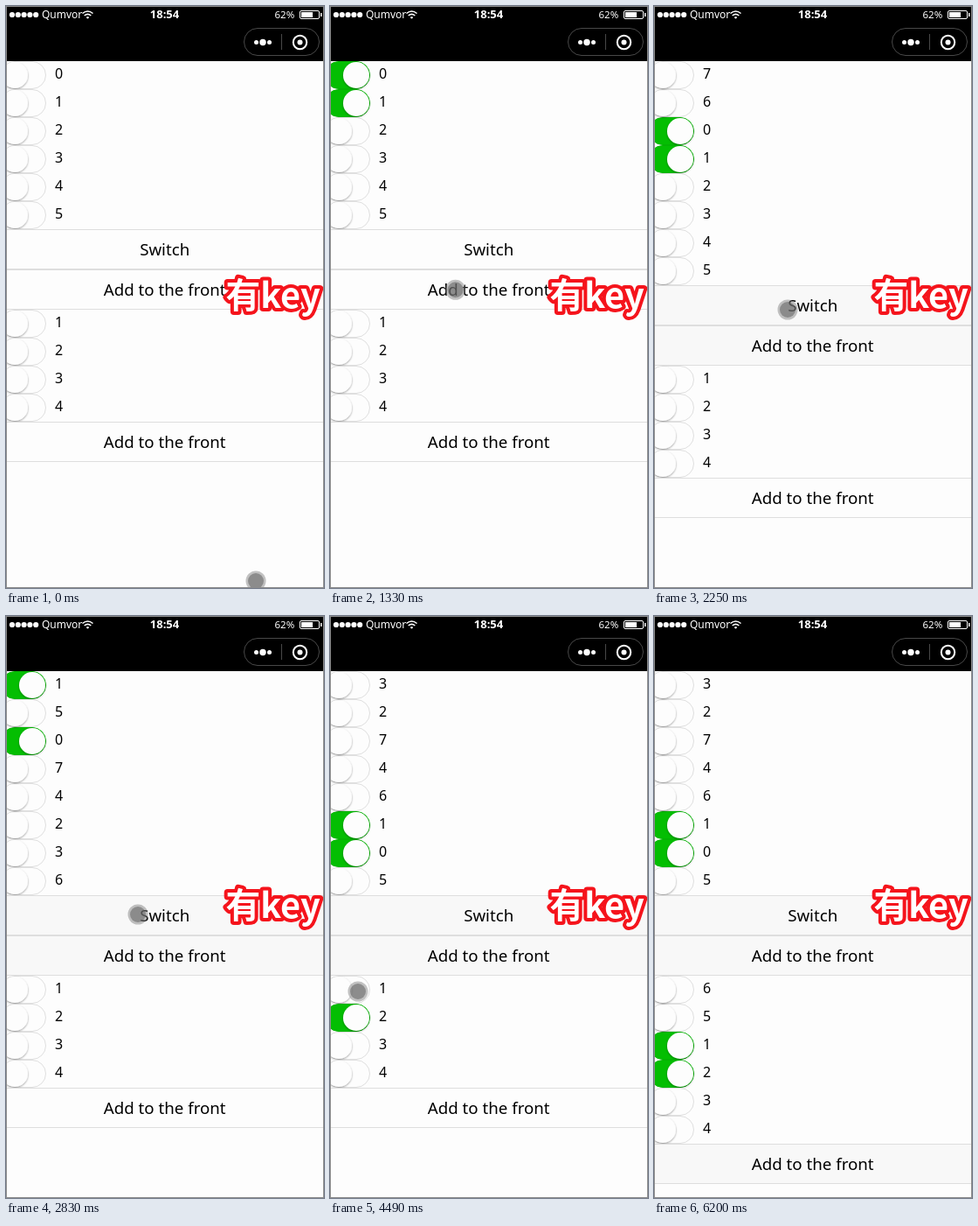
Recreate the animation shown at these times as an HTML page. Size 364 by 665 pixels, loop 6.71 s.

```html
<!DOCTYPE html>
<html lang="en">
<head>
<meta charset="utf-8">
<title>Keyed list demo</title>
<style>
  html, body { margin: 0; width: 100%; height: 100%; overflow: hidden; background: #fdfdfd; }
  svg { display: block; font-family: "Noto Sans", "Open Sans", sans-serif; }
  .badge { font: bold 39.7px "Noto Sans CJK SC", "Noto Sans CJK JP", "Noto Sans CJK", sans-serif; }
</style>
</head>
<body>
<svg id="stage" width="364" height="665" viewBox="0 0 364 665">
  <defs>
    <filter id="shadow" x="-30%" y="-30%" width="160%" height="160%">
      <feDropShadow dx="0" dy="1" stdDeviation="1.1" flood-color="#000" flood-opacity=".4"/>
    </filter>
  </defs>
  <rect width="364" height="665" fill="#fdfdfd"/>
  <g id="content"></g>

  <rect width="364" height="63" fill="#000"/>
  <g id="signal" fill="#fff"></g>
  <g fill="#fff">
    <text x="41" y="14" font-size="12" font-weight="500">Qumvor</text>
    <text x="181.500" y="14" font-size="13" font-weight="600" text-anchor="middle">18:54</text>
    <text x="307.500" y="14" font-size="11.500" font-weight="500">62%</text>
  </g>
  <g fill="none" stroke="#fff" stroke-width="1.6">
    <path d="M87.500 8.500Q93.500 3.500 99.500 8.500M89.700 11Q93.500 7.700 97.300 11"/>
    <path d="M92 13L93.500 14.200L95 13Q93.500 11.800 92 13Z" fill="#fff" stroke-width=".6"/>
  </g>
  <rect x="336.500" y="5.500" width="22" height="9" rx="1.500" fill="none" stroke="#fff"/>
  <rect x="338" y="7" width="13" height="6" fill="#fff"/>
  <rect x="360" y="8" width="1.500" height="4" fill="#fff"/>

  <rect x="272.500" y="25.500" width="86" height="31" rx="15.500" fill="#000" stroke="#484848"/>
  <path d="M315.500 32V50" stroke="#484848"/>
  <g fill="#fff">
    <circle cx="286.500" cy="41.500" r="2.500"/>
    <circle cx="294" cy="41.500" r="3.700"/>
    <circle cx="301.500" cy="41.500" r="2.500"/>
    <circle cx="336.500" cy="41.500" r="3"/>
  </g>
  <circle cx="336.500" cy="41.500" r="7.700" fill="none" stroke="#fff" stroke-width="2"/>

  <g id="pointer">
    <circle r="11.500" fill="#787878" fill-opacity=".45"/>
    <circle r="9" fill="#646464" fill-opacity=".57"/>
  </g>
  <text class="badge" x="251.500" y="344.500" fill="#fff" stroke="#f5141c" stroke-width="8"
        stroke-linejoin="round" paint-order="stroke">有key</text>
  <rect x=".5" y=".5" width="363" height="664" fill="none" stroke="#8c8c8c"/>
</svg>
<script>
const LOOP = 6710, TOP = 63, ROW = 32, BUTTON = 46, TOGGLE_MS = 170;
const content = document.getElementById('content');
const pointer = document.getElementById('pointer');

// Each step: start time and the keys listed from then on.
const upperSteps = [[0, '012345'], [1530, '6012345'], [2170, '76012345'],
                    [2560, '15074236'], [3140, '32746105']];
const lowerSteps = [[0, '1234'], [5290, '51234'], [5650, '651234']];
const upperToggles = { 0: 655, 1: 850 };
const lowerToggles = { 2: 4180, 1: 4590 };

// Pointer path: time, x, y.
const path = [
  [30, 286, 657], [240, 218, 485], [430, 92, 238], [590, 28, 80], [690, 27.5, 82],
  [770, 27.5, 107], [940, 27.5, 107], [1040, 72, 165], [1140, 90, 225], [1260, 130, 300],
  [1380, 153, 341], [1500, 153, 346], [1840, 153, 347], [2350, 153, 347], [2560, 151, 341],
  [3200, 151, 341], [3500, 125, 433], [3750, 125, 484], [3900, 88, 482], [4080, 31, 459],
  [4370, 31, 459], [4490, 32, 429], [4720, 32, 429], [4900, 100, 520], [5130, 150, 558],
  [5300, 152, 562], [5510, 155, 587], [5700, 155, 590], [5870, 157, 597], [6180, 165, 680]
];

function add(parent, tag, attrs, text) {
  const node = document.createElementNS('http://www.w3.org/2000/svg', tag);
  for (const name in attrs) node.setAttribute(name, attrs[name]);
  if (text) node.textContent = text;
  return parent.appendChild(node);
}

for (let i = 0; i < 5; i++) {
  add(document.getElementById('signal'), 'circle', { cx: 7 + i * 6.8, cy: 10, r: 3.1 });
}

function makeRow(key) {
  const group = add(content, 'g', {});
  const track = add(group, 'rect', { x: -5.5, y: 0.5, width: 51, height: 31, rx: 15.5 });
  const knob = add(group, 'circle', { cy: 16, r: 15, fill: '#fdfdfd', filter: 'url(#shadow)' });
  add(group, 'text', { x: 56, y: 20, 'font-size': 16 }, key);
  return { group, track, knob };
}

function makeList(keys, steps, toggles) {
  const rows = {};
  for (const key of keys) rows[key] = makeRow(key);
  return { rows, steps, toggles };
}

function makeButton(label, tintTime) {
  const group = add(content, 'g', {});
  const face = add(group, 'rect', { x: -2, y: 0.5, width: 368, height: BUTTON - 1, stroke: '#dedede' });
  add(group, 'text', { x: 181.7, y: 29.5, 'font-size': 18.7, 'text-anchor': 'middle' }, label);
  return { group, face, tintTime };
}

const upper = makeList('01234567', upperSteps, upperToggles);
const lower = makeList('123456', lowerSteps, lowerToggles);
const shuffleButton = makeButton('Switch', 2170);
const upperAdd = makeButton('Add to the front', 1530);
const lowerAdd = makeButton('Add to the front', 5290);

const clamp = v => Math.max(0, Math.min(1, v));
const moveTo = (node, x, y) => node.setAttribute('transform', `translate(${x} ${y})`);

function mix(from, to, k) {
  return `rgb(${from.map((v, i) => Math.round(v + (to[i] - v) * k))})`;
}

// Places the rows from y on and returns the bottom edge.
function drawList(list, y, t) {
  const order = list.steps.filter(step => step[0] <= t).pop()[1];
  for (const key in list.rows) {
    const { group, track, knob } = list.rows[key];
    const index = order.indexOf(key);
    group.setAttribute('display', index < 0 ? 'none' : 'inline');
    moveTo(group, 0, y + index * ROW);
    const start = list.toggles[key];
    const linear = start === undefined ? 0 : clamp((t - start) / TOGGLE_MS);
    const on = 1 - (1 - linear) ** 2;
    knob.setAttribute('cx', 10 + 20 * on);
    track.setAttribute('fill', mix([253, 253, 253], [4, 190, 2], on));
    track.setAttribute('stroke', mix([223, 223, 223], [4, 180, 2], on));
  }
  return y + order.length * ROW;
}

function drawButton(button, y, t) {
  moveTo(button.group, 0, y);
  button.face.setAttribute('fill', t < button.tintTime ? '#fdfdfd' : '#f8f8f8');
  return y + BUTTON;
}

function drawPointer(t) {
  const last = path[path.length - 1];
  pointer.setAttribute('display', t < last[0] ? 'inline' : 'none');
  const next = path.findIndex(point => point[0] > t);
  if (next < 0) return;
  const b = path[next], a = path[Math.max(0, next - 1)];
  const k = b === a ? 0 : (t - a[0]) / (b[0] - a[0]);
  moveTo(pointer, a[1] + (b[1] - a[1]) * k, a[2] + (b[2] - a[2]) * k);
}

function render(t) {
  let y = drawList(upper, TOP, t);
  y = drawButton(shuffleButton, y, t);
  y = drawButton(upperAdd, y, t);
  y = drawList(lower, y, t);
  drawButton(lowerAdd, y, t);
  drawPointer(t);
}

const startTime = performance.now();
function tick() {
  render((performance.now() - startTime) % LOOP);
  requestAnimationFrame(tick);
}
tick();
</script>
</body>
</html>
```
